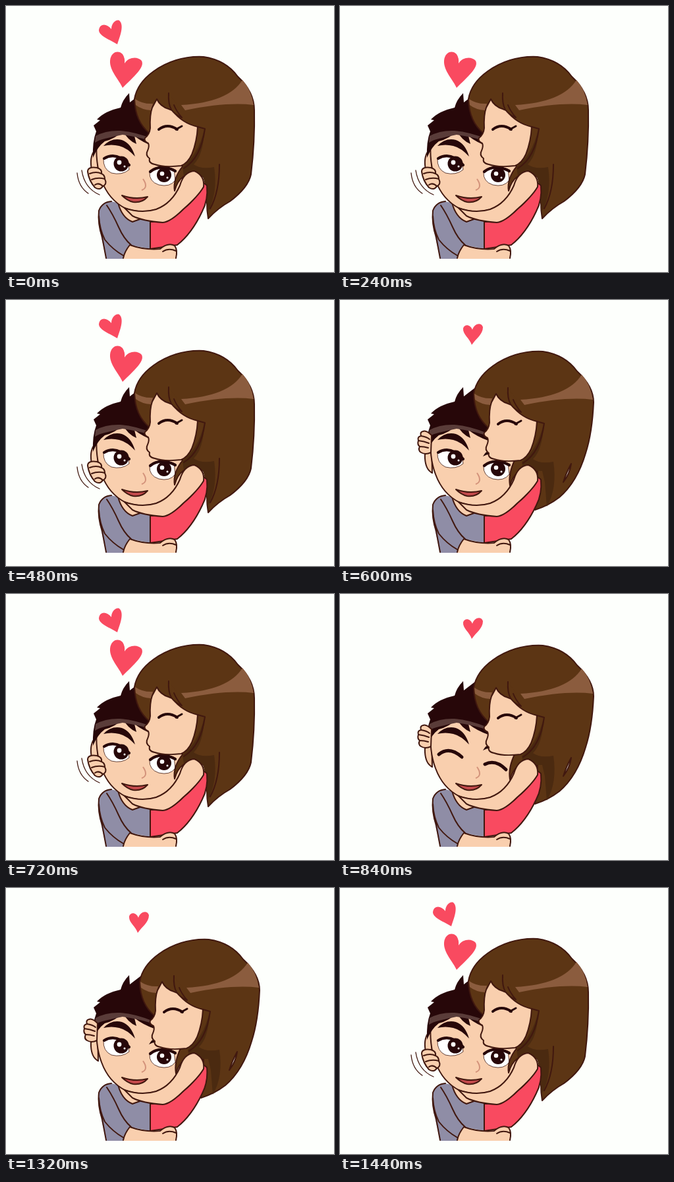
An HTML page that plays this animation: 498 px wide and 403 px high, repeating every 1560 ms.

```html
<!DOCTYPE html>
<html lang="en">
<meta charset="utf-8">
<title>Hug</title>
<style>
  html, body { margin: 0; height: 100%; overflow: hidden; background: #fdfffc; }
  svg { display: block; width: 100vw; height: 100vh; }
  .ink { stroke: #41180f; stroke-width: 2; stroke-linejoin: round; stroke-linecap: round; }
  .line { fill: none; }
  .skin { fill: #f9cfae; }
  .hair { fill: #5c3514; }
  .shade { fill: #4b2a10; }
  .shine { fill: #8b5c3e; }
  .dark { fill: #270709; }
  .heart, .dress { fill: #f94a60; }
  .shirt { fill: #8f8da6; }
  .lid { fill: none; stroke: #270709; stroke-width: 5; stroke-linecap: round; }
</style>
<svg viewBox="0 0 498 403">
  <path id="bigHeart" class="heart" d="M177 124C172 112 157 98 158 83C159 70 170 66 177 73Q181 79 180 87C186 77 200 76 206 83C211 93 195 106 177 124Z"/>
  <path id="leftHeart" class="heart" d="M169 58C158 51 142 46 141 37C142 26 153 26 160 35C160 26 167 20 172 22C180 29 173 46 169 58Z"/>
  <path id="midHeart" class="heart" d="M200 68C197 58 186 52 187 43C189 36 198 37 201 45C204 36 214 33 217 41C217 52 207 58 200 68Z"/>

  <g id="shirt">
    <path class="shirt" d="M160 296Q146 297 141 310Q139 330 145 352L152 383H178L188 362L219 368V310Z"/>
    <path class="ink line" d="M152 382L146 350Q139 330 141 310Q146 297 160 296M141 318Q142 338 150 354Q162 369 178 378M153 302Q162 315 171 335Q179 353 190 362M219 326V367"/>
    <path class="ink skin" d="M170 298Q176 321 192 327L206 322Z"/>
  </g>

  <g id="boy">
    <path class="ink skin" d="M139 215Q128 222 129 240Q130 257 140 262Z"/>
    <path class="ink skin" d="M138 200Q135 238 145 264Q156 294 182 307Q215 318 244 301Q264 283 272 250L255 190H150Z"/>
    <path class="dark" d="M132 230Q131 205 137 190L133 181L143 173L138 172Q150 159 174 154Q177 142 187 132L188 146L205 133L226 150L230 206L225 213Q208 207 195 197L198 209Q184 203 178 189Q166 201 150 205Q139 213 132 230Z"/>
    <path fill="#5a3c39" d="M136 197Q152 188 174 189Q198 191 224 202V206Q205 199 177 195Q166 197 150 201Q141 203 135 207Z"/>
    <path class="dark" d="M148 212Q160 199 176 203Q190 208 196 228Q184 215 172 212Q160 209 148 212ZM217 237Q221 229 230 227L231 234Q224 233 217 237Z"/>
    <g id="openEyes">
      <path class="ink" style="stroke-width:.8" fill="#fff" d="M148 231Q147 247 160 253Q176 257 187 248L185 236Q170 223 148 231ZM218 252Q217 266 232 271Q249 275 257 264L255 247Q235 239 218 252Z"/>
      <circle class="dark" cx="175" cy="239" r="11.500"/>
      <circle class="dark" cx="240" cy="256" r="11"/>
      <g fill="#fff">
        <circle cx="172" cy="237" r="3.400"/><circle cx="180" cy="243" r="1.500"/>
        <circle cx="237" cy="254" r="3.300"/><circle cx="245" cy="260" r="1.500"/>
      </g>
      <path class="lid" style="stroke-width:4.200" d="M149 231Q168 220 187 241M219 251Q234 239 257 250"/>
    </g>
    <path id="shutEyes" class="lid" d="M150 243Q166 230 185 247M220 258Q236 250 252 266"/>
    <path class="line" stroke="#d3927a" stroke-width="2" d="M208 262Q217 275 206 279"/>
    <path class="ink" fill="#c2494b" d="M176 287Q196 294 215 289Q206 299 193 297Q184 295 176 287Z"/>
  </g>

  <g id="girl">
    <path id="hairNear" class="ink hair" d="M195 141Q199 117 224 99Q258 75 300 77Q334 82 352 107Q377 130 377 158Q378 205 372 255Q368 275 340 296Q322 306 307 322Q303 300 307 270L299 258H270Q260 265 256 280Q253 262 268 243L240 200L218 193Q196 175 195 141Z"/>
    <path id="hairFar" class="ink hair" d="M195 141Q199 117 224 99Q258 75 300 77Q334 82 352 107Q377 130 377 154Q375 200 365 231Q352 275 325 298Q308 311 288 317L292 258H264Q254 266 250 280Q247 262 258 240L240 200L218 193Q196 175 195 141Z"/>
    <path class="shade" d="M301 187Q300 225 285 240Q296 248 316 244Q322 285 306 312L303 275L299 258H270L268 244Q292 225 301 187Z"/>
    <path class="shine" d="M266 150Q338 146 359 112Q372 126 376 150Q335 145 272 158ZM196 141Q208 149 223 148L220 158Q206 157 197 150Z"/>
    <path class="ink skin" d="M229 141Q234 152 247 156L252 158Q268 178 291 183Q290 205 282 225Q276 238 266 242Q240 245 226 240Q216 238 218 231Q211 226 215 219Q218 212 216 208Q209 205 211 200Q218 195 219 185Q218 165 222 154Z"/>
    <path class="hair" d="M246 132Q245 148 250 157Q256 165 267 169Q261 160 259 148Z"/>
    <path class="ink line" d="M247 132Q246 148 251 157Q257 165 267 169Q259 160 255 150M291 183L302 186Q296 230 270 246"/>
    <path class="lid" style="stroke-width:4" d="M232 187Q245 177 260 187"/>
    <path class="lid" style="stroke-width:3" d="M258 187L267 182"/>
    <path id="strandNear" class="ink line" d="M324 240Q324 282 310 307"/>
    <path id="strandFar" class="ink" fill="#fdfffc" d="M343 247Q341 262 331 275Q335 262 343 247Z"/>
  </g>

  <path class="ink dress" d="M299 267L305 272Q307 294 298 311Q282 345 260 362L219 368V327Q250 328 270 307Q292 290 299 267Z"/>
  <path class="ink skin" d="M180 306Q205 315 228 308Q252 299 264 272Q270 251 286 250Q302 257 300 274Q292 288 269 308Q250 327 238 328Q208 326 192 318Z"/>
  <path class="skin" d="M178 383Q180 372 188 362Q210 370 234 368Q246 358 256 363Q261 370 258 383Z"/>
  <path class="ink line" d="M178 382Q180 372 188 362Q210 370 234 368Q246 358 256 363Q261 370 258 382M238 372Q247 366 258 371"/>

  <g id="handLow" class="ink">
    <path class="skin" d="M138 245Q124 243 124 251Q126 265 135 275Q143 280 147 273Q154 270 150 262Q150 256 145 254Q146 247 138 245Z"/>
    <path class="line" d="M127 254Q137 250 145 254M130 263Q140 259 150 262M135 271Q141 267 147 273"/>
    <path class="line" style="stroke-width:1.300" d="M108 253Q110 274 125 284M115 249Q119 276 142 286"/>
  </g>
  <g id="handHigh" class="ink">
    <path class="skin" d="M139 205Q131 197 126 199Q121 200 123 206Q117 207 119 213Q117 219 121 222Q118 228 123 231Q130 235 138 231Z"/>
    <path class="line" d="M123 206Q131 207 136 211M119 213Q128 214 135 217M121 222Q128 222 134 224"/>
  </g>
</svg>
<script>
  const STEP = 120, STEPS = 13, BLINK = 7, LONE_HEART = 2;
  const el = id => document.getElementById(id);
  const show = (on, ...ids) => ids.forEach(id => el(id).style.display = on ? "" : "none");

  function draw(now) {
    const step = Math.floor(now / STEP) % STEPS;
    const away = step % 2 === 1;
    show(!away, "bigHeart", "hairNear", "strandNear", "handLow");
    show(away, "midHeart", "hairFar", "strandFar", "handHigh");
    show(!away && step !== LONE_HEART, "leftHeart");
    show(step !== BLINK, "openEyes");
    show(step === BLINK, "shutEyes");
    el("girl").setAttribute("transform", away ? "translate(8 1)" : "");
    requestAnimationFrame(draw);
  }
  draw(performance.now());
</script>
</html>
```
